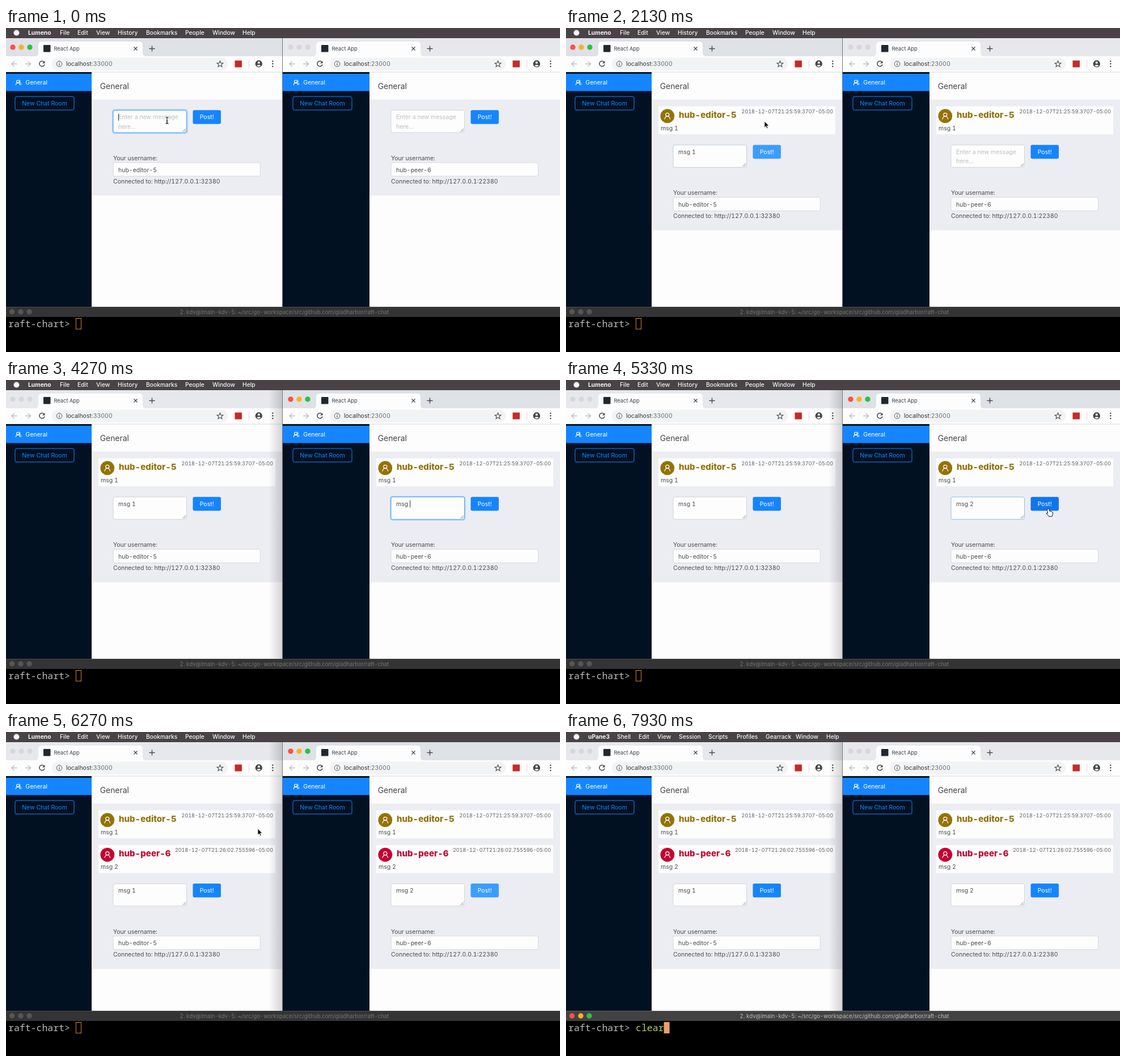
Write an HTML page that moves like this. It is 977x573 px and loops after 8000 ms.

```html
<!DOCTYPE html>
<html lang="en">
<head>
<meta charset="utf-8">
<title>Chat demo</title>
<style>
  html, body { margin: 0; width: 100%; height: 100%; overflow: hidden; background: #000; }
  svg { display: block; width: 100%; height: 100%; }
  text { font: 10.5px Inter, sans-serif; font-variant-numeric: tabular-nums; white-space: pre; }
  .mono { font: 16.53px "Noto Sans Mono", monospace; }
</style>
</head>
<body>
<svg id="stage" viewBox="0 0 977 573"></svg>
<script>
const LOOP = 8000;
const POSTED = [2090, 5480];
const RIGHT_FOCUS = 2870, MENU_SWITCH = 6900, TERMINAL_FOCUS = 7000;
const ROW = 61.4;
const BLUE = '#1585ff', INK = '#4d4d4f';
const MESSAGES = [
  { user: 'hub-editor-5', color: '#947306', time: '2018-12-07T21:25:59.3707-05:00', body: 'msg 1' },
  { user: 'hub-peer-6', color: '#c6002f', time: '2018-12-07T21:26:02.755596-05:00', body: 'msg 2' },
];
const MENUS = [
  { Lumeno: 39, File: 95, Edit: 126, View: 159, History: 197, Bookmarks: 247, People: 316, Window: 364, Help: 417 },
  { uPane3: 39, Shell: 90, Edit: 128, View: 161, Session: 199, Scripts: 251, Profiles: 301, Gearrack: 352, Window: 405, Help: 459 },
];
const WINDOWS = [
  {
    x: 0, edge: 0, port: '33000', server: '32380', user: 'hub-editor-5', draft: 'msg 1',
    keys: [600, 740, 880, 1020, 1200], active: t => t < RIGHT_FOCUS,
    border: [[1900, 1], [2200, 0]], glow: [[1900, 1], [2080, 0]], caret: [0, 1900],
    button: [[1600, 0], [1750, 1], [1900, 1], [1980, -1], [2100, 1], [RIGHT_FOCUS, 1], [2920, 0]],
  },
  {
    x: 490, edge: 488, port: '23000', server: '22380', user: 'hub-peer-6', draft: 'msg 2',
    keys: [3750, 3900, 4050, 4200, 4420], active: t => t >= RIGHT_FOCUS && t < TERMINAL_FOCUS,
    border: [[2650, 0], [2900, .8], [3000, 1], [5180, 1], [5480, 0]],
    glow: [[2930, 0], [3130, 1], [5150, 1], [5320, 0]], caret: [2960, 5180],
    button: [[5000, 0], [5100, 1], [5250, 1], [5360, -1], [5480, 1], [TERMINAL_FOCUS, 1], [7100, 0]],
  },
];
const POINTER = [
  [450, 284, 163], [1380, 284, 163], [1530, 332, 163], [1750, 350, 165], [2150, 350, 165],
  [2720, 768, 224], [4650, 768, 224], [5080, 851, 228], [5580, 851, 228],
  [6270, 444, 171], [6850, 250, 526],
];
const POINTER_HIDDEN = [[600, 1380], [3750, 4650], [7350, LOOP]];
const COMMAND_KEYS = [7350, 7450, 7550, 7650, 7760];

// Eased interpolation through [time, ...values] keys.
function track(keys, t) {
  const next = keys.findIndex(k => k[0] > t);
  if (next === 0) return keys[0].slice(1);
  if (next < 0) return keys.at(-1).slice(1);
  const a = keys[next - 1], b = keys[next];
  const u = (t - a[0]) / (b[0] - a[0]), e = u * u * (3 - 2 * u);
  return a.slice(1).map((v, i) => v + (b[i + 1] - v) * e);
}
const mix = (a, b, u) => `rgb(${a.map((v, i) => Math.round(v + (b[i] - v) * u))})`;
const typed = (keys, t) => keys.filter(k => k <= t).length;

const pen = document.createElement('canvas').getContext('2d');
const textWidth = s => { pen.font = '10.5px Inter, sans-serif'; return pen.measureText(s).width; };

const rect = (x, y, w, h, fill, more = '') => `<rect x="${x}" y="${y}" width="${w}" height="${h}" fill="${fill}" ${more}/>`;
const circle = (x, y, r, fill, more = '') => `<circle cx="${x}" cy="${y}" r="${r}" fill="${fill}" ${more}/>`;
const line = (d, color, width = 1.3, more = '') => `<path d="${d}" fill="none" stroke="${color}" stroke-width="${width}" ${more}/>`;
const text = (x, y, s, fill = INK, style = '', more = '') => `<text x="${x}" y="${y}" fill="${fill}" style="${style}" ${more}>${s}</text>`;
const group = (x, y, body) => `<g transform="translate(${x} ${y})">${body}</g>`;
const lights = (xs, y, on, off) => xs.map((x, i) => circle(x, y, 4.7, on ? ['#fb4f4a', '#fcb024', '#2bc23f'][i] : off)).join('');
const person = (x, y, s, color) => circle(x, y - 2.5 * s, 3.2 * s, 'none', `stroke="${color}" stroke-width="1.2"`) +
  line(`M${x - 5 * s} ${y + 6 * s}a${5 * s} ${5.6 * s} 0 0 1 ${10 * s} 0`, color, 1.2);

function menuBar(t) {
  const items = Object.entries(MENUS[t < MENU_SWITCH ? 0 : 1]);
  return rect(0, 0, 977, 18, '#494347') + circle(18.5, 8.5, 5, '#f6f4f5') +
    items.map(([name, x], i) => text(x, 12.2, name, '#f6f4f5', `font-weight:${i ? 500 : 700};font-size:10.3px`)).join('');
}

function browserChrome(w, active) {
  return rect(-2, 18, 489, 60, active ? '#dee1e6' : '#e6e8ec') +
    lights([12, 27, 42], 34, active, '#d6d8dc') +
    `<path d="M51 50q6 0 6-6V30q0-6 6-6H235q6 0 6 6v14q0 6 6 6z" fill="#fdfdfe"/>` +
    rect(-2, 50, 489, 28, '#fdfdfe') +
    rect(66, 30, 12.5, 12.5, '#20272e', 'rx="1"') +
    text(84.5, 40, 'React App', '#3c4043', 'font-size:9.3px') +
    line('M225.5 33.5l6 6m0-6l-6 6', '#45494d') +
    line('M252.5 36.5h10m-5-5v10', '#45494d', 1.4) +
    line('M19.5 63.5h-9.5m4.5-4.5l-4.5 4.5l4.5 4.5M34 63.5h9.5m-4.5-4.5l4.5 4.5l-4.5 4.5', '#b9bbbe') +
    line('M67.5 60.5a4.7 4.7 0 1 0 .6 4', '#45494d', 1.5) + '<path d="M68.5 58v4.5H64z" fill="#45494d"/>' +
    rect(81, 52.5, 310, 22.5, '#f1f3f4', 'rx="11.25"') +
    circle(94, 63.5, 4.8, 'none', 'stroke="#55595d"') + line('M94 62.8v3.4M94 60.5v1.2', '#55595d', 1.2) +
    text(106, 67.2, `localhost<tspan fill="#6a6e72">:${w.port}</tspan>`, '#303337') +
    line('M377.5 58.3l1.5 3.6 3.9.3-3 2.5 1 3.8-3.4-2.1-3.4 2.1 1-3.8-3-2.5 3.9-.3z', '#45494d', 1.1) +
    rect(403.5, 57.5, 12.5, 12, '#c92a27') + line('M428.5 57v13', '#d5d7da', 1) +
    circle(445.8, 63.3, 6.2, '#45494d') + circle(445.8, 61.3, 2, '#fff') +
    '<path d="M442 66.5q3.8-3 7.6 0q-3.8 3.5-7.6 0" fill="#fff"/>' +
    [58.7, 63.3, 67.9].map(y => circle(470.3, y, 1.25, '#45494d')).join('');
}

function messageCard(m, i) {
  return group(0, i * ROW,
    rect(163, 138.5, 312, 49.5, '#fdfdfe') + circle(178.8, 155.7, 12.4, m.color) + person(178.8, 155.7, .95, '#fff') +
    text(199, 159, m.user, m.color, 'font-size:15px;font-weight:800') +
    text(471, 151, m.time, '#5e5e60', 'font-size:9px', 'text-anchor="end"') +
    text(167, 180.6, m.body));
}

function composer(w, t) {
  const draft = w.draft.slice(0, typed(w.keys, t));
  const [border] = track(w.border, t), [glow] = track(w.glow, t), [press] = track(w.button, t);
  const fill = mix([21, 133, 255], press > 0 ? [60, 157, 255] : [13, 110, 228], Math.abs(press));
  const idle = t - Math.max(w.caret[0], ...w.keys.filter(k => k <= t));
  const caretOn = t >= w.caret[0] && t < w.caret[1] && idle % 1000 < 530;
  return rect(188, 144.5, 131.5, 41.5, 'none', `rx="4" stroke="#1890ff" stroke-opacity="${.32 * glow}" stroke-width="2"`) +
    rect(189, 145.5, 129.5, 39.5, '#fdfdfe', `rx="3" stroke="${mix([212, 213, 217], [76, 167, 250], border)}"`) +
    (draft ? text(198, 161.3, draft)
      : text(198, 161.3, 'Enter a new message', '#bfbfc2') + text(198, 177.5, 'here...', '#bfbfc2')) +
    (caretOn ? rect(198 + textWidth(draft), 151.5, 1, 12.5, '#333') : '') +
    line('M311.5 183.5l5.5-5.5m-2.5 5.5l2.5-2.5', '#777', .9) +
    rect(329.5, 145.3, 49.5, 24.5, fill, 'rx="3"') +
    text(354.2, 161.3, 'Post!', '#fff', '', 'text-anchor="middle"') +
    text(189, 234, 'Your username:') +
    rect(189, 238, 259.5, 24, '#fdfdfe', 'rx="3" stroke="#d7d8dc"') + text(198, 254.6, w.user) +
    text(189, 274.5, `Connected to: http://127.0.0.1:${w.server}`);
}

function browser(w, t) {
  const count = typed(POSTED, t), left = w.edge - w.x;
  return group(w.x, 0,
    browserChrome(w, w.active(t)) +
    rect(left, 78, 487 - left, 415, '#fdfdfe') + rect(left, 77.5, 487 - left, 1, '#d9dade') +
    rect(left, 78, 151 - left, 415, '#011122') + rect(left, 81, 151 - left, 30.5, BLUE) +
    person(21, 96.5, .75, '#fff') + line('M23.5 91.5q3 2 .8 4.5q2.3 1.5 2.3 4.5', '#fff', 1) +
    text(34.3, 100.2, 'General', '#fff') +
    rect(16, 121.2, 104, 23.8, 'none', `rx="3" stroke="${BLUE}"`) +
    text(68, 136.8, 'New Chat Room', BLUE, '', 'text-anchor="middle"') +
    text(165.7, 107.5, 'General', '#454547', 'font-size:13.9px') +
    rect(151, 126.5, 336, 169.7 + count * ROW, '#ebedf2') +
    MESSAGES.slice(0, count).map(messageCard).join('') +
    group(0, count * ROW, composer(w, t)));
}

function terminal(t) {
  const active = t >= TERMINAL_FOCUS, n = typed(COMMAND_KEYS, t), x = 123 + n * 9.92;
  return rect(0, 493, 977, 80, '#000') + rect(0, 493, 977, 18, active ? '#424243' : '#343435') +
    rect(0, 493, 977, 1, active ? '#666' : '#484848') +
    lights([10.5, 26, 41], 502, active, '#565657') +
    text(491, 505.6, '2. kdv@lmain-kdv-5: ~/src/go-workspace/src/github.com/gladharbor/raft-chat',
      active ? '#bdbdbe' : '#757576', 'font-size:9.7px', 'text-anchor="middle"') +
    text(4, 529, 'raft-chart&gt; ', '#b9bdb9', '', 'class="mono"') +
    text(123, 529, 'clear'.slice(0, n), '#abd268', '', 'class="mono"') +
    (active ? rect(x, 513, 10, 20, '#eea063') : rect(123.5, 513.5, 9, 19, 'none', 'stroke="#c58843"'));
}

function pointer(t) {
  if (POINTER_HIDDEN.some(([a, b]) => t >= a && t < b)) return '';
  const [x, y] = track(POINTER, t), shift = typed(POSTED, t) * ROW;
  const px = x >= 488 ? x - 490 : x, py = y - shift;
  const inside = (l, r, top, bottom) => px > l && px < r && py > top && py < bottom;
  if (y > 511 || inside(189, 319, 145, 185)) {
    const beam = 'M-2.5 -5.5q2.5 0 2.5 2V4q0 2-2.5 2M2.5 -5.5q-2.5 0-2.5 2V4q0 2 2.5 2M-1.5 1.5h3';
    return group(x, y, line(beam, '#fff', 2.4) + line(beam, '#111', 1.1));
  }
  const shape = inside(334, 379, 145, 170)
    ? '<path d="M-1 0q1.4-1 2 .5l1.2 4 1-.5 1 .8 1.2-.3.8 1 1 .2.3 3.5-1.2 4h-6l-1-2-3.3-3q.2-1.8 2.2-.8l.6.4-1.4-6.5q-.2-1 1.6-1.3z" fill="#fff" stroke="#111"/>'
    : '<path d="M0 0V11.2L2.6 8.8 4.3 12.8 6.1 12 4.4 8.1H7.9z" fill="#050505" stroke="#fff" stroke-width=".8"/>';
  return group(x, y, shape);
}

function scene(t) {
  const rightOnTop = t >= RIGHT_FOCUS;
  const shade = `<defs><linearGradient id="shade"><stop offset="${rightOnTop ? 0 : 1}" stop-opacity="0"/>` +
    `<stop offset="${rightOnTop ? 1 : 0}" stop-opacity=".16"/></linearGradient></defs>`;
  return shade + menuBar(t) + WINDOWS.map(w => browser(w, t)).join('') +
    rect(rightOnTop ? 463 : 488, 18, rightOnTop ? 24 : 16, 475, 'url(#shade)') +
    rect(487, 18, 1, 475, '#77787b') + terminal(t) + pointer(t);
}

const stage = document.getElementById('stage');
const start = performance.now();
let shown = '';
function frame() {
  const markup = scene((performance.now() - start) % LOOP);
  if (markup !== shown) stage.innerHTML = shown = markup;
  requestAnimationFrame(frame);
}
frame();
</script>
</body>
</html>
```
